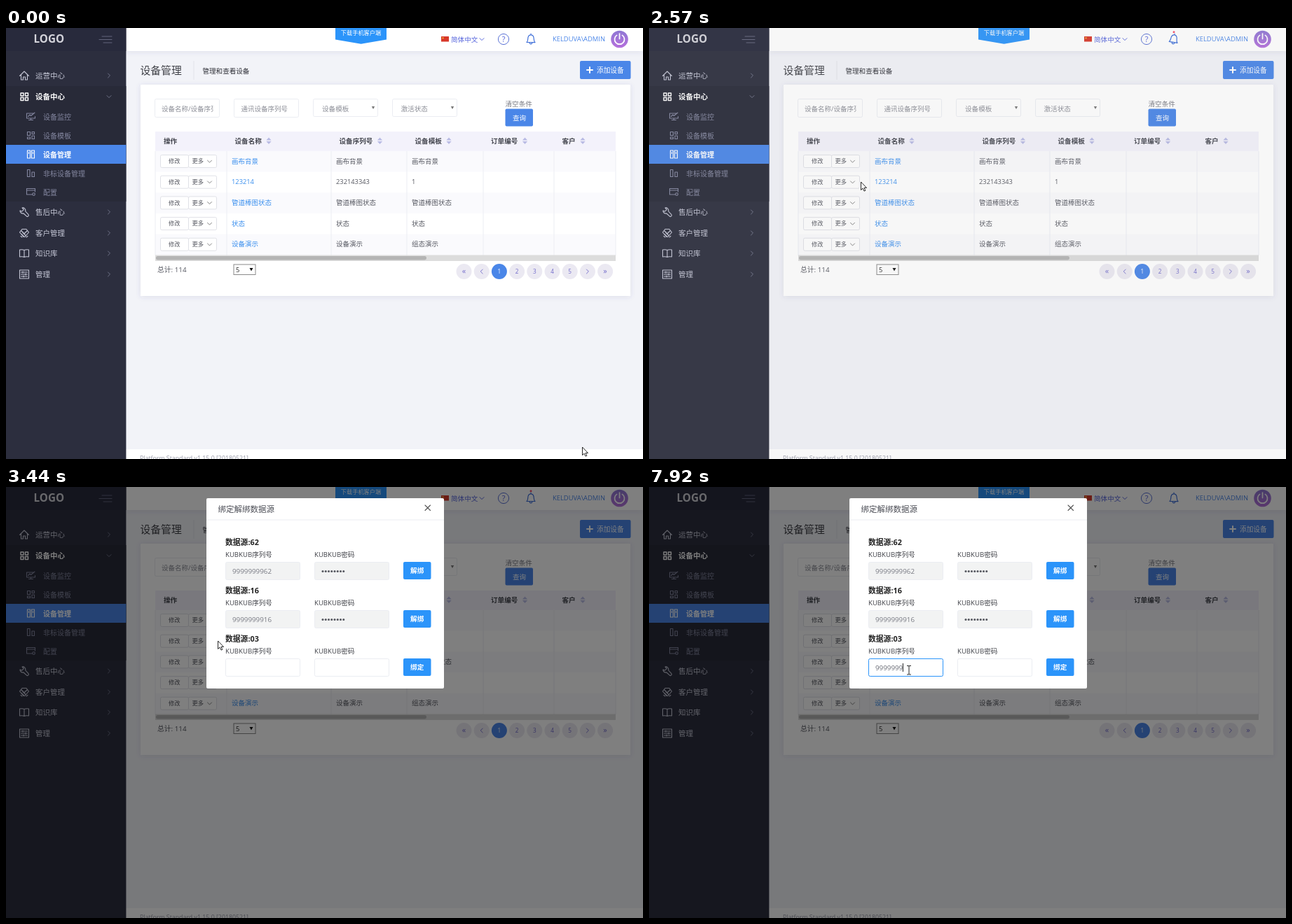
An HTML page that plays this animation: 909x616 px, repeating every 8000 ms.

```html
<!DOCTYPE html>
<html lang="zh-CN">
<head>
<meta charset="utf-8">
<title>设备管理</title>
<style>
html, body { margin: 0; width: 100%; height: 100%; overflow: hidden; background: #f2f3f8; }
svg { display: block; width: 100%; height: 100%; }
text { font-family: "Open Sans", "Noto Sans CJK SC", "Noto Sans CJK", sans-serif; white-space: pre; }
.line { fill: none; stroke-linecap: round; stroke-linejoin: round; }
</style>
</head>
<body>
<svg id="stage" viewBox="0 0 909 616" xmlns="http://www.w3.org/2000/svg"></svg>
<script>
const BLUE = '#4a86e8', LINK = '#3a8fee', BRIGHT = '#2b94fa', INK = '#575962', EDGE = '#ebedf2';
const LOOP = 8000;

// Text is placed by the vertical middle of its line.
const text = (s, x, cy, size, fill, extra = '') =>
  `<text x="${x}" y="${cy + size * 0.37}" font-size="${size}" fill="${fill}" ${extra}>${s}</text>`;
const mid = (s, x, cy, size, fill, extra = '') => text(s, x, cy, size, fill, 'text-anchor="middle" ' + extra);
const rect = (x, y, w, h, fill, extra = '') =>
  `<rect x="${x}" y="${y}" width="${w}" height="${h}" fill="${fill}" ${extra}/>`;
const box = (x, y, w, h, fill = '#fff', stroke = EDGE, r = 2) =>
  rect(x + 0.5, y + 0.5, w - 1, h - 1, fill, `stroke="${stroke}" rx="${r}"`);
const path = (d, stroke, w = 1, extra = '') =>
  `<path class="line" d="${d}" stroke="${stroke}" stroke-width="${w}" ${extra}/>`;
const icon = (d, x, y, stroke, w = 1.1) => path(d, stroke, w, `transform="translate(${x} ${y})"`);
const solid = (d, fill) => `<path d="${d}" fill="${fill}"/>`;
const circle = (x, y, r, fill, extra = '') => `<circle cx="${x}" cy="${y}" r="${r}" fill="${fill}" ${extra}/>`;
const group = (id, body, extra = '') => `<g id="${id}" ${extra}>${body}</g>`;
const BOLD = 'font-weight="700"';
const DOWN = 'M-3 -1.4L0 1.6L3 -1.4', RIGHT = 'M-1.5 -3L1.5 0L-1.5 3', LEFT = 'M1.5 -3L-1.5 0L1.5 3';

const ICONS = {
  home: 'M-6.5 .5L0 -6L6.5 .5M-4.5 -1V6H-1.5V2H1.5V6H4.5V-1',
  grid: 'M-5 -5h4v4h-4zM1.5 -5h4v4h-4zM-5 1.5h4v4h-4zM1.5 1.5h4v4h-4z',
  wrench: 'M-6 -2A4 4 0 0 0 -1 2L3.5 6.2A1.8 1.8 0 0 0 6 3.7L1.7 -1A4 4 0 0 0 -3 -6L-.7 -3.4L-3.4 -.8Z',
  hands: 'M-6.5 -1L-3 -5.5H3L6.5 -1L1 5.5H-1ZM-4 -3L0 1L4 -3M-4 1.5L-.5 5M-2 -.5L2 3.5M-5 4.5L-3 6M5 4.5L3 6',
  book: 'M0 -4.5C-2 -5.5 -4 -5.5 -6.5 -5V5C-4 4.5 -2 4.5 0 5.5C2 4.5 4 4.5 6.5 5V-5C4 -5.5 2 -5.5 0 -4.5V5.5',
  sliders: 'M-6.5 -6h13v12h-13zM-4.5 -3H4.5M-4.5 0H4.5M-4.5 3H4.5M-2 -4v2M2 -1v2M-1 2v2',
  monitor: 'M4 -4.5H-6V2.5H6V0M-3 5H3M0 2.5V5M-4 0L-1.5 -2.5L0 -1L5.5 -5.5',
  blocks: 'M-5 -5h4v5h-4zM1.5 -5h3.5v3h-3.5zM-5 2.5h4v2.5h-4zM1.5 .5h3.5v4.5h-3.5z',
  columns: 'M-5 -5.5h4v11h-4zM1 -5.5h4v11h-4zM-3 -3v2M3 -3v2',
  bars: 'M-5 -5h3.5v10h-3.5zM1.5 -1.5h3.5v6.5h-3.5z',
  gear: 'M2 3.5H-6V-5H6V-.5M-6 -2.5H6M5.8 3a1.8 1.8 0 1 1 -3.6 0a1.8 1.8 0 1 1 3.6 0'
};

function sidebar() {
  const w = 171.4;
  let s = rect(0, 0, w, 616, '#2c2e3e') + rect(0, 0, w, 33, '#282a3c') + rect(0, 83, w, 165, '#282a38');
  s += text('LOGO', 39.6, 15.5, 15.2, '#d3d3da', BOLD);
  s += path('M137 12H151M133 16.5H151M139 21H151', '#63657c');
  s += rect(0, 167, w, 27, BLUE);
  [['运营中心', 68, 'home'], ['设备中心', 98, 'grid'], ['售后中心', 263, 'wrench'],
   ['客户管理', 293, 'hands'], ['知识库', 322, 'book'], ['管理', 352, 'sliders']].forEach(([name, y, key], i) => {
    const open = i === 1, col = open ? '#fff' : '#c5c7d6';
    s += icon(ICONS[key], 26, y, col, open ? 1.4 : 1.1) + text(name, 42, y, 10.5, col, open ? BOLD : '');
    s += icon(open ? DOWN : RIGHT, 147, y, '#6f7288', 1);
  });
  ['设备监控', '设备模板', '设备管理', '非标设备管理', '配置'].forEach((name, i) => {
    const y = 127 + i * 27, on = i === 2, col = on ? '#fff' : '#83869f';
    const key = ['monitor', 'blocks', 'columns', 'bars', 'gear'][i];
    s += icon(ICONS[key], 35.5, y - 0.5, col) + text(name, 53, y, 10, col, on ? BOLD : '');
  });
  return s;
}

function topbar() {
  let s = rect(171, 0, 738, 33, '#fff', 'filter="url(#soft)"');
  s += solid('M470 0H543V16.5L506.5 22.8L470 16.5Z', BRIGHT) + mid('下载手机客户端', 506.5, 7, 8.2, '#fff');
  s += rect(621, 12, 11, 7.5, '#d8382a') + circle(623.5, 14.3, 1.1, '#f5c93b');
  s += text('简体中文', 635, 16, 9.6, '#5867dd') + icon(DOWN, 679, 16, '#5867dd', 1);
  s += circle(710, 16, 7.6, 'none', 'stroke="#5c74d6"') + mid('?', 710, 16, 11, '#5867dd');
  s += group('bell', path('M743 20.5C745 19 744.5 16 745 13.5C745.6 10.8 747 9.8 749 9.8S752.4 10.8 753 13.5C753.5 16 753 19 755 20.5ZM747.2 21.5A1.9 1.9 0 0 0 750.8 21.5M749 9.5V8.2', '#3f6fd8', 1.2));
  s += circle(749, 5.8, 1.5, '#f4516c', 'id="dot"');
  s += text('KELDUVA\\ADMIN', 780, 16, 9.4, BLUE);
  s += circle(875.5, 16, 12.3, 'url(#violet)');
  s += path('M871.6 10.4A7 7 0 1 0 879.4 10.4M875.5 8V15.5', '#fff', 1.7);
  return s;
}

function filters() {
  let s = box(212, 101, 93, 27) + box(325, 101, 93, 27) + box(438, 101, 93, 26) + box(551, 101, 93, 26);
  s += `<g clip-path="url(#field)">${text('设备名称/设备序列号', 222, 115, 9.5, '#8c8e97')}</g>`;
  s += text('通讯设备序列号', 335.5, 115, 9.5, '#8c8e97');
  s += text('设备模板', 451, 115, 9.6, '#8c8e97') + text('激活状态', 563.5, 115, 9.6, '#8c8e97');
  for (const x of [524, 637]) s += solid(`M${x - 2.2} 112h4.4l-2.2 4z`, '#777');
  s += text('清空条件', 712.5, 108.5, 9.6, '#7b7d86');
  return s + rect(712.5, 115.5, 39.5, 25, BLUE, 'rx="2"') + mid('查询', 732.5, 128, 9.6, '#fff');
}

function table() {
  let s = rect(213, 148, 657, 28, '#f3f2fb');
  const rows = [['画布背景', '画布背景', '画布背景'], ['123214', '232143343', '1'],
    ['管道棒图状态', '管道棒图状态', '管道棒图状态'], ['状态', '状态', '状态'], ['设备演示', '设备演示', '组态演示']];
  rows.forEach((cells, i) => {
    const y = 190.3 + i * 29.7;
    if (i % 2 === 0) s += rect(213, y - 14.5, 657, 29.7, '#fafafd');
    s += box(220, y - 9.3, 41, 19, '#fff', '#e0e1e7') + box(260, y - 9.3, 41, 19, '#fff', '#e0e1e7');
    s += mid('修改', 240.2, y, 8.3, INK) + mid('更多', 273.7, y, 8.3, INK) + icon(DOWN, 290.5, y + 0.3, '#777', 0.9);
    cells.forEach((c, k) => s += text(c, [322, 471, 579][k], y - 0.3, c > '9' ? 9.5 : 9.3, k ? INK : LINK));
  });
  for (const x of [213, 315, 464, 572, 681, 782, 870]) s += rect(x - 0.5, 176, 1, 149, '#ecedf4');
  [['操作', 225], ['设备名称', 326.5, 375], ['设备序列号', 475.5, 533.5], ['设备模板', 583.5, 632],
   ['订单编号', 692, 740.5], ['客户', 793.5, 823]].forEach(([name, x, sort]) => {
    s += text(name, x, 161.5, 9.6, '#42444d', BOLD);
    if (sort) s += solid(`M${sort - 3.6} 160.6h7.2l-3.6 -4zM${sort - 3.6} 162h7.2l-3.6 4z`, '#b9bbe4');
  });
  s += rect(213, 324.5, 657, 8.5, '#dcdcdc') + rect(214, 326, 386, 5.5, '#b4b4b4', 'rx="2.7"');
  s += text('总计: 114', 216, 345.5, 9.8, INK);
  s += box(324.5, 337.5, 32, 15.5, '#fff', '#8a8a8a', 0) + text('5', 328, 345.5, 9.3, '#222') + solid('M347.5 343h5l-2.5 4.5z', '#111');
  ['«', '‹', '1', '2', '3', '4', '5', '›', '»'].forEach((c, i) => {
    const x = 653.5 + i * 25.2, on = i === 2;
    s += circle(x, 348, 11, on ? BLUE : '#ebe9f2');
    const col = on ? '#fff' : '#716aca';
    if (c === '‹' || c === '›') s += icon(c === '›' ? RIGHT : LEFT, x, 348, col, 0.9);
    else s += mid(c, x, c > '9' ? 347 : 348, c > '9' ? 11 : 8.2, col);
  });
  return s;
}

function content() {
  let s = text('设备管理', 191.5, 60.5, 14.8, '#3f4047') + rect(267.5, 47, 1, 27, '#e2e3ea');
  s += text('管理和查看设备', 280.5, 61.5, 9.55, '#2f3038');
  s += rect(819, 47, 72.5, 26, BLUE, 'rx="2"') + path('M833 56V64M829 60H837', '#fff', 2) + text('添加设备', 843, 60.3, 9.7, '#fff');
  s += rect(192, 81, 699, 302, '#fff', 'filter="url(#soft)"') + filters() + table();
  s += rect(171, 602, 738, 14, '#fff');
  return s + text('Platform Standard v1.15.0 [20180521]', 191, 614.5, 8.8, '#9a9caa');
}

function menu() {
  const items = ['删除', '绑定解绑数据源', '强制同步数据', '刷新设备状态', '绑定摄像头', '设备权限'];
  return rect(259, 178.5, 95, 174.5, '#fff', 'filter="url(#lift)" rx="2"') +
    items.map((s, i) => text(s, 270, 197 + i * 27.5, 9.6, '#676a78')).join('');
}

function modal() {
  let s = rect(286, 16, 339, 272, '#fff', 'rx="2"') + rect(286, 46.5, 339, 1, EDGE);
  s += text('绑定解绑数据源', 302.5, 31.5, 11.5, '#4c4e56') + path('M598 26L605.5 33.5M605.5 26L598 33.5', '#555', 1.1);
  ['62', '16', '03'].forEach((n, i) => {
    const y = i * 69, free = i === 2, fill = free ? '#fff' : '#f2f3f3';
    s += text('数据源:' + n, 313, 79 + y, 10.8, '#222', BOLD);
    s += text('KUBKUB序列号', 313, 96.5 + y, 9.6, '#3f4047') + text('KUBKUB密码', 440, 96.5 + y, 9.6, '#3f4047');
    s += box(313, 107 + y, 107, 26, fill) + box(440, 107 + y, 107, 26, fill);
    if (!free) {
      s += text('99999999' + n, 323, 120 + y, 9.8, '#777982');
      for (let k = 0; k < 8; k++) s += circle(452 + k * 4.25, 120.5 + y, 1.5, '#55575f');
    }
    s += rect(567, 107 + y, 39.5, 25, BRIGHT, 'rx="2"') + mid(free ? '绑定' : '解绑', 586.7, 119.7 + y, 9.6, '#fff', BOLD);
  });
  s += rect(313.5, 107.5, 106, 25, 'none', `id="focus" rx="2" stroke="${BRIGHT}"`);
  s += text('', 323, 258, 9.8, '#676a74', 'id="typed"') + rect(0, 252, 1, 12, '#222', 'id="caret"');
  return s;
}

const cursors =
  group('arrow', '<path d="M0 0V11.5L2.6 9.1L4.5 13.1L6.3 12.3L4.5 8.4H8Z" fill="#fff" stroke="#111" stroke-width=".9"/>') +
  group('hand', '<path d="M-1.4 9V1.2A1.4 1.4 0 0 1 1.4 1.2V5.5C2 4.8 3.4 4.9 3.8 5.9C4.6 5.4 5.8 5.6 6 6.6C7 6.2 8 6.8 8 8V11.5C8 13 7 14 6.8 15.5H0C-.4 13.8 -2.4 12 -3.8 9.6C-4.3 8.6 -3 7.6 -2.1 8.4Z" fill="#fff" stroke="#111" stroke-width=".9"/><path class="line" d="M1.4 5.5V9M3.8 6V9M6 6.8V9" stroke="#111" stroke-width=".7"/>') +
  group('beam', path('M-2.5 -6H-.8L0 -5.4L.8 -6H2.5M0 -5.4V5.9M-2.5 6.5H-.8L0 5.9L.8 6.5H2.5', '#222', 1));

const shadow = (id, dy, blur, alpha) =>
  `<filter id="${id}" x="-20%" y="-20%" width="140%" height="150%"><feDropShadow dx="0" dy="${dy}" stdDeviation="${blur}" flood-color="#455080" flood-opacity="${alpha}"/></filter>`;

document.getElementById('stage').innerHTML =
  `<defs>${shadow('soft', 1, 3.5, 0.12)}${shadow('lift', 1, 4, 0.25)}
  <clipPath id="field"><rect x="213" y="101" width="82.5" height="27"/></clipPath>
  <linearGradient id="violet" x2="0" y2="1"><stop stop-color="#8f78d4"/><stop offset="1" stop-color="#b56fdc"/></linearGradient></defs>` +
  rect(0, 0, 909, 616, '#f2f3f8') + topbar() + content() + sidebar() + group('menu', menu()) +
  rect(0, 0, 909, 616, '#000', 'id="shade"') + group('modal', modal()) + cursors;

const el = {};
for (const id of ['bell', 'dot', 'menu', 'shade', 'modal', 'focus', 'typed', 'caret', 'arrow', 'hand', 'beam'])
  el[id] = document.getElementById(id);
const set = (id, name, value) => el[id].setAttribute(name, value);
const show = (id, on) => set(id, 'visibility', on ? 'visible' : 'hidden');
const clamp = (v, a = 0, b = 1) => Math.min(b, Math.max(a, v));

// Pointer stops: time, x, y
const STOPS = [[70, 822.5, 599], [850, 281, 191], [940, 281, 279], [1000, 281, 279], [1750, 302.5, 220],
  [3440, 302.5, 220], [4130, 393, 119], [4500, 393, 119], [4980, 375, 186], [5200, 375, 186], [5440, 371, 261.5]];

function pointer(t) {
  let i = 0;
  while (i < STOPS.length - 2 && t >= STOPS[i + 1][0]) i++;
  const [a, b] = [STOPS[i], STOPS[i + 1]];
  const p = clamp((t - a[0]) / (b[0] - a[0]));
  const e = p * p * (3 - 2 * p);
  return [a[1] + (b[1] - a[1]) * e, a[2] + (b[2] - a[2]) * e];
}

function draw(t) {
  const early = t < 3060, late = t >= 5990;
  const swing = early ? Math.sin(t / 209 * 2 * Math.PI) : late ? Math.sin((t - 7920) / 209 * 2 * Math.PI) : 0;
  set('bell', 'transform', `rotate(${10 * swing} 749 15)`);
  const half = t % 1000 >= 500;
  show('dot', early ? half : late ? !half : true);

  show('menu', t >= 900 && t < 2410);
  const dim = t >= 2610;
  set('shade', 'fill', dim ? '#000' : '#aaa');
  set('shade', 'opacity', dim ? 0.5 : t >= 2530 ? 0.09 : 0);

  const p = clamp((t - 2690) / 300);
  set('modal', 'opacity', clamp(p * 2));
  set('modal', 'transform', `translate(0 ${-68 * (1 - p) ** 2})`);

  const field = t >= 5670 ? 2 : t >= 5220 ? 1 : 0;
  set('focus', 'y', 107.5 + field * 69);
  set('focus', 'opacity', t >= 4440 ? 1 : 0);
  const count = clamp(Math.floor((t - 6930) / 160) + 1, 0, 7);
  el.typed.textContent = '9'.repeat(count);
  set('caret', 'x', 322.7 + (count ? el.typed.getComputedTextLength() : 0));
  set('caret', 'opacity', field === 2 && (count || (t - 5670) % 1060 < 530) ? 1 : 0);

  const [x, y] = pointer(t);
  const overField = t > 3440 && x > 313 && y > 107 && (y - 107) % 69 < 26;
  const kind = overField ? 'beam' : t >= 790 && t < 2410 ? 'hand' : 'arrow';
  for (const id of ['arrow', 'hand', 'beam']) show(id, id === kind);
  set(kind, 'transform', `translate(${x} ${y})`);
}

const start = performance.now();
function tick() {
  draw((performance.now() - start) % LOOP);
  requestAnimationFrame(tick);
}
tick();
</script>
</body>
</html>
```
